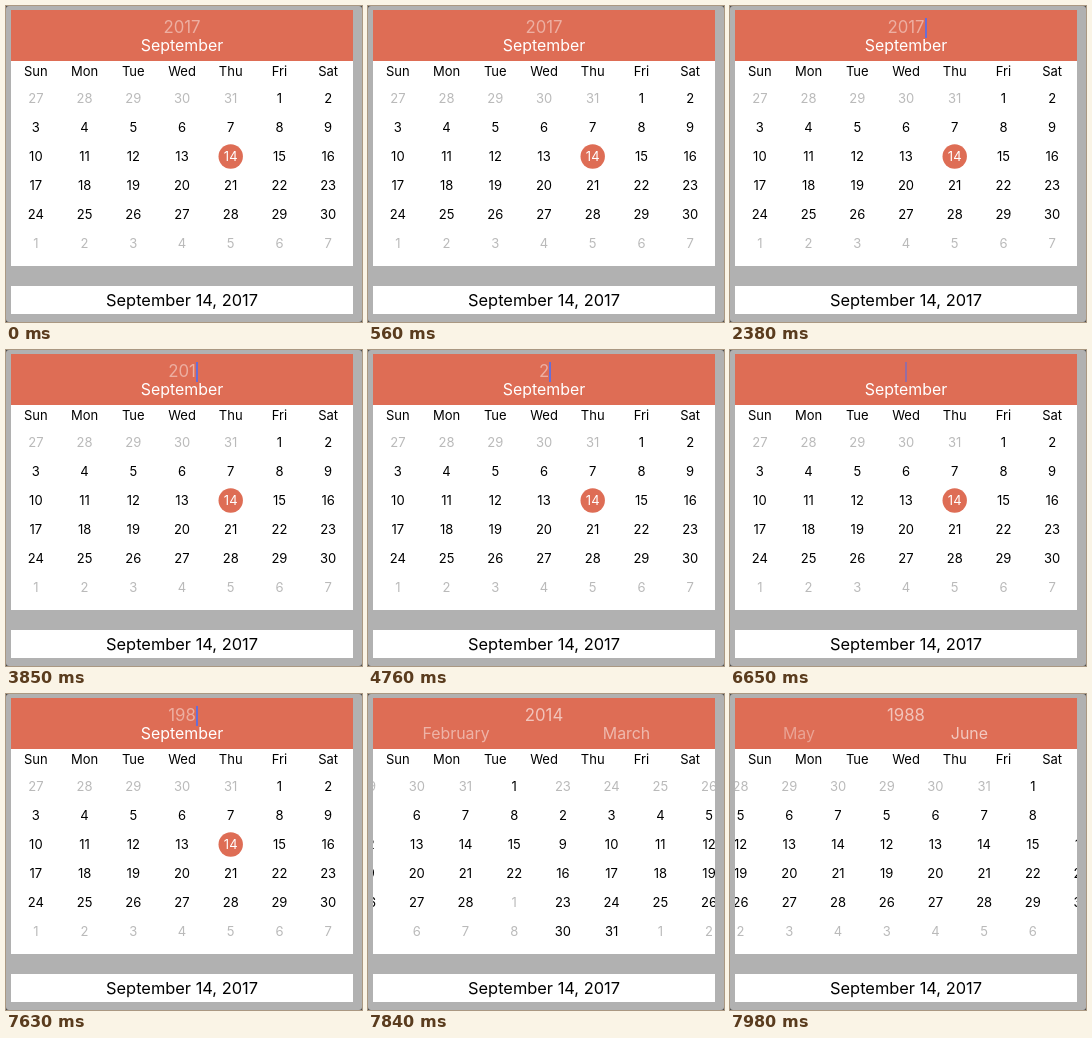
Recreate the animation shown at these times as an HTML page with a canvas. Size 356 by 316 pixels, loop 8000 ms.

```html
<!DOCTYPE html>
<html lang="en">
<head>
<meta charset="utf-8">
<title>Calendar year entry</title>
<style>
html, body { margin: 0; width: 100%; height: 100%; overflow: hidden; background: #444; }
canvas { display: block; width: 356px; height: 316px; }
</style>
</head>
<body>
<canvas id="stage" width="356" height="316"></canvas>
<script>
const ctx = document.getElementById('stage').getContext('2d');
const LOOP = 8000, TICK = 70;
const CORAL = '#de6d55', GRAY = '#b1b1b1', CURSOR = '#686ed6';
const MID = 176, PAGE = 341, COL = PAGE / 7, ROW = 29;
const WEEKDAYS = ['Sun', 'Mon', 'Tue', 'Wed', 'Thu', 'Fri', 'Sat'];
const MONTHS = ['January', 'February', 'March', 'April', 'May', 'June', 'July',
  'August', 'September', 'October', 'November', 'December'];
const START = 2017 * 12 + 8;
const SCROLL_AT = 7770;

// [time, text in the year field]
const TYPING = [[0, '2017'], [3570, '201'], [4130, '20'], [4760, '2'],
  [5740, ''], [6930, '1'], [7280, '19'], [7630, '198']];
// [time, opacity of the text cursor]
const BLINK = [[0, 0], [2380, 1], [5670, 0], [5740, 1], [6160, .65], [6230, .3],
  [6300, 0], [6650, .6], [6720, 1]];

const at = (keys, t) => keys.filter(k => k[0] <= t).pop()[1];
const clamp = v => Math.max(0, Math.min(1, v));
const colX = i => MID + (i - 3) * COL;

function box(x, y, w, h, color) {
  ctx.fillStyle = color;
  ctx.fillRect(x, y, w, h);
}

function label(text, x, y, size, color, alpha = 1) {
  ctx.font = `${size}px Inter, Roboto, sans-serif`;
  ctx.globalAlpha = alpha;
  ctx.fillStyle = color;
  ctx.fillText(text, x, y);
  ctx.globalAlpha = 1;
}

function drawMonth(index, shift) {
  const year = Math.floor(index / 12), month = index % 12;
  const lead = new Date(year, month, 1).getDay() || 7;
  for (let i = 0; i < 42; i++) {
    const day = new Date(year, month, 1 - lead + i);
    const x = colX(i % 7) + shift, y = 97 + Math.floor(i / 7) * ROW;
    const inside = day.getMonth() === month;
    const chosen = index === START && inside && day.getDate() === 14;
    if (chosen) {
      ctx.fillStyle = CORAL;
      ctx.beginPath();
      ctx.arc(x, y - 4.5, 12.2, 0, 7);
      ctx.fill();
    }
    label(day.getDate(), x, y, 13, chosen ? '#fff' : inside ? '#000' : '#bababa');
  }
}

function drawYear(t, pos) {
  const scrolling = t > SCROLL_AT;
  const text = scrolling ? String(Math.floor(Math.round(pos) / 12)) : at(TYPING, t);
  label(text, MID, 27, 16.8, '#fff', scrolling ? .6 : .45);
  if (scrolling) return;
  const x = text ? Math.round(MID + ctx.measureText(text).width / 2) : 175;
  ctx.globalAlpha = at(BLINK, t);
  box(x, 12, 2, 20, CURSOR);
  ctx.globalAlpha = 1;
}

// Tip of the edit menu that hangs above the stage
function drawMenuTip(t) {
  ctx.globalAlpha = clamp((t - 3010) / 210) * clamp((3850 - t) / 350);
  ctx.fillStyle = '#444';
  ctx.beginPath();
  ctx.moveTo(192, 0);
  ctx.lineTo(197, 0);
  ctx.lineTo(194.5, 2.5);
  ctx.fill();
  ctx.globalAlpha = 1;
}

function draw(time) {
  const t = Math.floor(time % LOOP / TICK) * TICK;
  const n = Math.max(0, (t - SCROLL_AT) / TICK);
  const pos = START - (37.32 * n * n + 5.164 * n);
  const first = Math.floor(pos);

  ctx.textAlign = 'center';
  ctx.clearRect(0, 0, 356, 316);
  ctx.fillStyle = GRAY;
  ctx.beginPath();
  ctx.roundRect(0, 0, 356, 316, 3);
  ctx.fill();
  drawMenuTip(t);
  box(5, 4, 342, 256, '#fff');
  box(5, 4, 342, 51, CORAL);
  box(5, 280, 342, 28, '#fff');

  ctx.save();
  ctx.beginPath();
  ctx.rect(5, 4, 342, 256);
  ctx.clip();
  WEEKDAYS.forEach((name, i) => label(name, colX(i), 70, 13, '#000'));
  for (const index of [first, first + 1]) {
    const away = index - pos;
    if (Math.abs(away) >= 1) continue;
    drawMonth(index, away * PAGE);
    label(MONTHS[index % 12], MID + away * PAGE / 2, 45, 15.9, '#fff', 1 - Math.abs(away));
  }
  drawYear(t, pos);
  ctx.restore();
  label('September 14, 2017', MID, 300, 16.4, '#000');
}

const begin = performance.now();
(function frame() {
  draw(performance.now() - begin);
  requestAnimationFrame(frame);
})();
</script>
</body>
</html>
```
